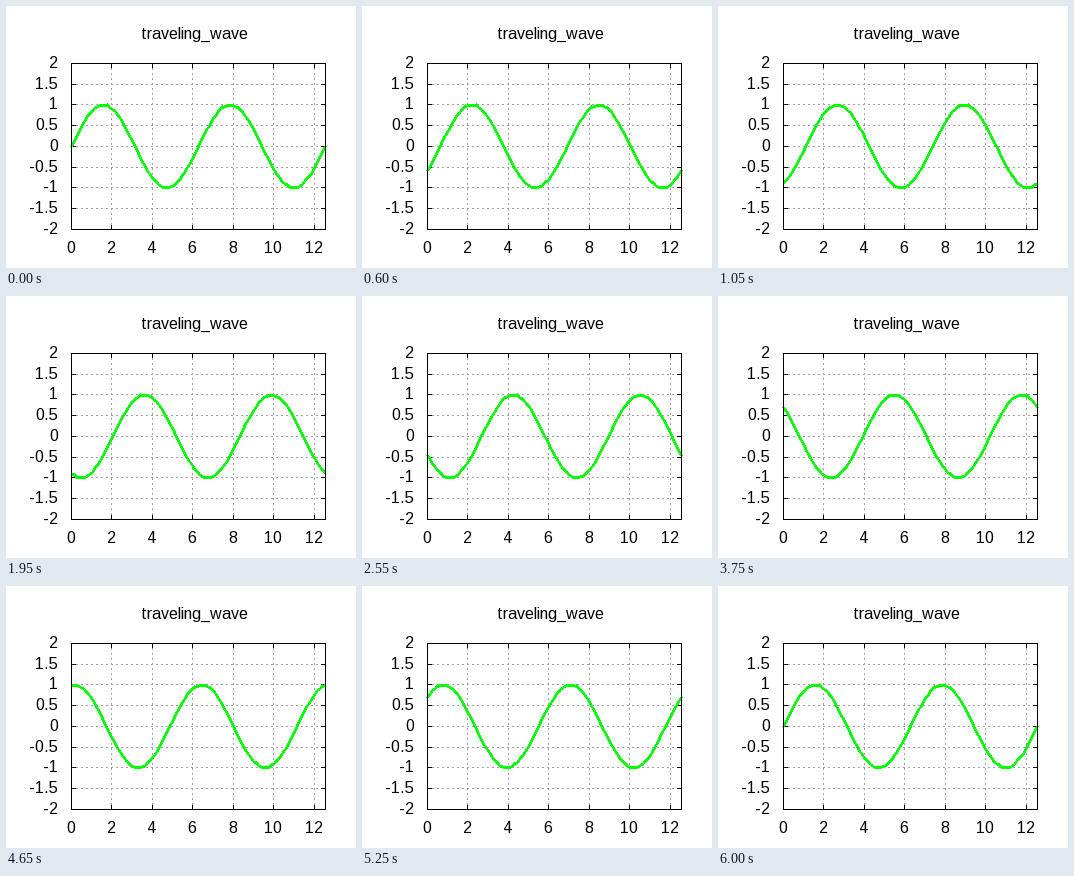
Recreate the animation shown at these times as a matplotlib script. Size 350x262 px, loop 6150 ms.

```python
import math
import numpy as np
import matplotlib.pyplot as plt
from matplotlib.animation import FuncAnimation

W, H, DPI = 350, 262, 100
LEFT, RIGHT, TOP, BOTTOM = 65, 319, 57, 223
X_MAX, Y_MAX = 4 * np.pi, 2
FRAMES, INTERVAL = 41, 150
PX = 72 / DPI  # one pixel in points
TICK = 5
THICK = 3

plt.rcParams.update({
    "font.family": "Liberation Sans",
    "font.size": 16 * PX,
    "text.hinting": "force_autohint",
    "text.hinting_factor": 1,
    "lines.scale_dashes": False,
})

fig = plt.figure(figsize=(W / DPI, H / DPI), dpi=DPI, facecolor="white")
ax = fig.add_axes([0, 0, 1, 1])


def to_px(x, y):
    """Data values to whole pixels, counted from the top left."""
    px = LEFT + np.floor((RIGHT - LEFT) * x / X_MAX + 0.5)
    py = BOTTOM - np.floor((BOTTOM - TOP) * (y + Y_MAX) / (2 * Y_MAX) + 0.5)
    return px.astype(int), py.astype(int)


def line(xs, ys, color="black", **kw):
    """One pixel wide line along pixel centres, without snapping."""
    ax.plot(xs, ys, color=color, lw=PX, snap=False, **kw)


def grid_line(xs, ys):
    line(xs, ys, "#a0a0a0", dashes=(2 * PX, 3 * PX),
         dash_capstyle="butt", zorder=1)


def tick(xs, ys):
    line(xs, ys, solid_capstyle="butt", zorder=2)


def label(x, y, text, ha):
    ax.text(x, y, text, ha=ha, va="baseline", color="black")


def draw_stroke(img, xs, ys):
    """Draw a hard-edged polyline: vertical runs where flat, horizontal where steep."""
    for x, y, dx, dy in zip(xs, ys, np.diff(xs), np.diff(ys)):
        steps = max(abs(dx), abs(dy))
        width = int(THICK * math.hypot(dx, dy) / steps)
        t = np.arange(steps + 1) / steps
        px = np.floor(x + dx * t + 0.5).astype(int)
        py = np.floor(y + dy * t + 0.5).astype(int)
        for w in range(-(width // 2), width - width // 2):
            if abs(dy) > abs(dx):
                img[py, px + w] = (0, 255, 0, 255)
            else:
                img[py + w, px] = (0, 255, 0, 255)


for value in range(0, 13, 2):
    px, _ = to_px(np.float64(value), np.float64(0))
    x = px + 0.5
    if value:
        grid_line([x, x], [TOP, BOTTOM + 1])
    tick([x, x], [TOP, TOP + TICK])
    tick([x, x], [BOTTOM + 1, BOTTOM + 1 - TICK])
    label(px, 247, str(value), "center")

for value in np.arange(-2, 2.5, 0.5):
    _, py = to_px(np.float64(0), value)
    y = py + 0.5
    if abs(value) < Y_MAX:
        grid_line([LEFT, RIGHT + 1], [y, y])
    tick([LEFT, LEFT + TICK], [y, y])
    tick([RIGHT + 1, RIGHT + 1 - TICK], [y, y])
    label(52, py + 5, f"{value:g}", "right")

label(135, 33, "traveling_wave", "left")

x0, x1, y0, y1 = LEFT + 0.5, RIGHT + 0.5, TOP + 0.5, BOTTOM + 0.5
line([x0, x1, x1, x0, x0], [y0, y0, y1, y1, y0], zorder=4,
     solid_joinstyle="miter", solid_capstyle="projecting")

xs = np.linspace(0, X_MAX, 100)
wave = ax.imshow(np.zeros((H, W, 4), np.uint8), extent=(0, W, H, 0),
                 aspect="auto", interpolation="nearest", zorder=3)
ax.set(xlim=(0, W), ylim=(H, 0))
ax.axis("off")


def update(frame):
    phase = 2 * np.pi * frame / (FRAMES - 1)
    img = np.zeros((H, W, 4), np.uint8)
    draw_stroke(img, *to_px(xs, np.sin(xs - phase)))
    wave.set_data(img)
    return [wave]


anim = FuncAnimation(fig, update, frames=FRAMES, interval=INTERVAL,
                     repeat=True, repeat_delay=0)
plt.show()
```
